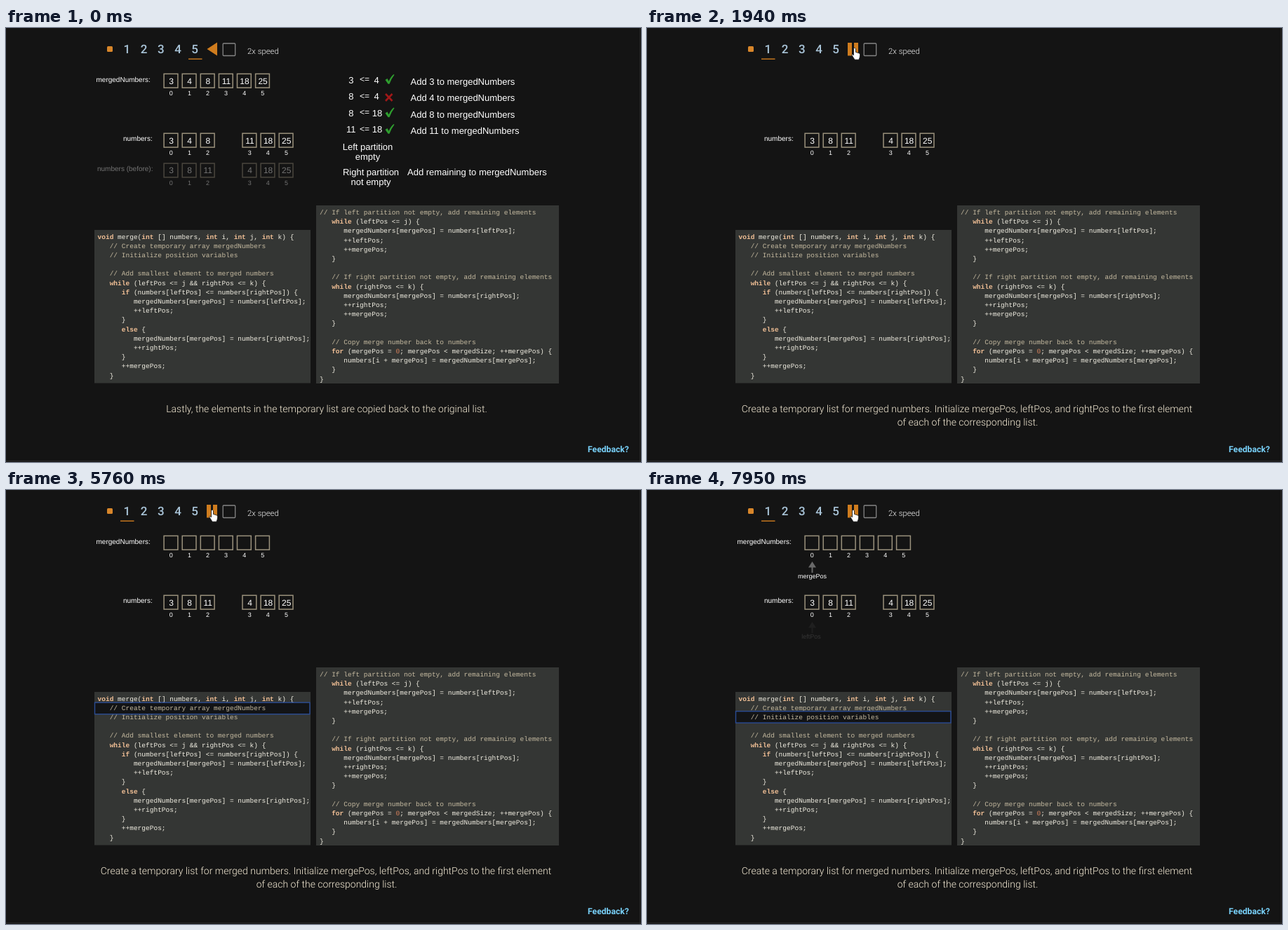
An HTML page for the animation above (8 s loop, 905x619 px).

```html
<!DOCTYPE html>
<html lang="en">
<head>
<meta charset="utf-8">
<title>Merging two partitions</title>
<style>
  html, body { margin: 0; width: 100%; height: 100%; overflow: hidden; background: #141414; }
  svg { display: block; width: 905px; height: 619px; }
  text { font-family: "Liberation Sans", Arial, sans-serif; font-size: 10px; fill: #fff;
         white-space: pre; text-rendering: geometricPrecision; }
  .mid { text-anchor: middle; }
  .ui { font-family: Roboto, sans-serif; }
  .step { font-size: 17px; font-weight: 500; fill: #a9c4d8; }
  .speed { font-size: 11.4px; font-weight: 300; fill: #f3f3f3; }
  .feedback { font-size: 12.2px; font-weight: 700; fill: #78d0f8; }
  .caption { font-size: 14px; font-weight: 300; fill: #f6ecd6; }
  .num { font-size: 12px; }
  .idx, .pos { font-size: 9px; }
  .note { font-size: 13px; }
  .cell { fill: none; stroke: #9a917c; stroke-width: 1.5; }
  .code { font-family: "Liberation Mono", "Courier New", monospace; font-size: 9.52px; fill: #f1eee2; }
  .comment { fill: #c5baa0; }
  .key { fill: #f2c096; font-weight: bold; }
  .lit { fill: #d9825c; }
</style>
</head>
<body>
<svg id="stage" viewBox="0 0 905 619"></svg>
<script>
const LOOP = 8000, PITCH = 26.1, LINE = 13.2;

const leftCode = `void merge(int [] numbers, int i, int j, int k) {
   // Create temporary array mergedNumbers
   // Initialize position variables

   // Add smallest element to merged numbers
   while (leftPos <= j && rightPos <= k) {
      if (numbers[leftPos] <= numbers[rightPos]) {
         mergedNumbers[mergePos] = numbers[leftPos];
         ++leftPos;
      }
      else {
         mergedNumbers[mergePos] = numbers[rightPos];
         ++rightPos;
      }
      ++mergePos;
   }`.split("\n");

const rightCode = `// If left partition not empty, add remaining elements
   while (leftPos <= j) {
      mergedNumbers[mergePos] = numbers[leftPos];
      ++leftPos;
      ++mergePos;
   }

   // If right partition not empty, add remaining elements
   while (rightPos <= k) {
      mergedNumbers[mergePos] = numbers[rightPos];
      ++rightPos;
      ++mergePos;
   }

   // Copy merge number back to numbers
   for (mergePos = 0; mergePos < mergedSize; ++mergePos) {
      numbers[i + mergePos] = mergedNumbers[mergePos];
   }
}`.split("\n");

// Markup helpers
const esc = s => String(s).replace(/&/g, "&amp;").replace(/</g, "&lt;");
const text = (x, y, cls, s) => `<text x="${x}" y="${y}" class="${cls}">${esc(s)}</text>`;
const rect = (x, y, w, h, attrs) => `<rect x="${x}" y="${y}" width="${w}" height="${h}" ${attrs}/>`;
const group = (id, ...parts) => `<g id="${id}">${parts.join("")}</g>`;

function codeLine(x, y, line) {
  const body = /^\s*\/\//.test(line)
    ? `<tspan class="comment">${line}</tspan>`
    : esc(line)
        .replace(/\b(void|int|while|if|else|for)\b/g, "<tspan class='key'>$1</tspan>")
        .replace(/= 0;/, "= <tspan class='lit'>0</tspan>;");
  return `<text x="${x}" y="${y}" class="code">${body}</text>`;
}
const codeBlock = (x, y, lines) => lines.map((s, i) => codeLine(x, y + i * LINE, s)).join("");

// Cell centres: one run of six, or two runs of three
const joined = i => 235 + i * PITCH;
const split = i => joined(i) + (i > 2 ? 33.6 : 0);
const six = fn => [0, 1, 2, 3, 4, 5].map(fn).join("");
const cells = (at, y) => six(i =>
  rect(at(i) - 9.9, y - 9.9, 19.8, 19.8, 'class="cell"') + text(at(i) + .3, y + 20.5, "idx mid", i));
const values = (at, y, list) => six(i => text(at(i) + .6, y + 4.4, "num mid", list[i]));

const pointer = (id, x, y, label) => group(id,
  `<path d="M235.5 ${y}l5.5 8.5h-4.5v7.5h-2v-7.5h-4.5z" fill="#696969"/>`,
  text(x, y + 24, "pos mid", label));

const tick = y => `<path d="M540.5 ${y + 1}l3-2 2 4q3-7 7-10l1 .8q-4 5-7 13h-2z" fill="#2f9e2f"/>`;
const cross = y => `<path d="M541 ${y - 5}l9.5 10m0-10l-9.5 10" stroke="#a01818" stroke-width="2.6"/>`;

const compare = (y, a, b, mark) =>
  text(491.8, y, "note mid", a) + text(504, y - 1.5, "num", "<=") +
  text(b > 9 ? 529 : 528, y, "note mid", b) + mark;

const sorted = [3, 4, 8, 11, 18, 25], before = [3, 8, 11, 4, 18, 25];

document.getElementById("stage").innerHTML = [
  rect(0, 0, 905, 619, 'fill="#141414"'),
  rect(903, 0, 1, 619, 'fill="#252525"') + rect(0, 617, 905, 1, 'fill="#2a2a2a"'),

  // Toolbar
  rect(144, 26, 8, 8, 'rx="1.5" fill="#d8862a"'),
  [1, 2, 3, 4, 5].map(n => text(148.2 + 24.2 * n, 36, "ui step mid", n)).join(""),
  rect(163, 43.5, 19.5, 1.4, 'id="underline" fill="#cf7c1e"'),
  '<path id="play" d="M286.5 30l14.5-9.5v19z" fill="#cf7c1e"/>',
  '<path id="pause" d="M286 21h6v18.5h-6zm9 0h6v18.5h-6z" fill="#cf7c1e"/>',
  rect(309.2, 22, 17.5, 17.5, 'rx="1" fill="none" stroke="#858585" stroke-width="1.3"'),
  text(344, 37, "ui speed", "2x speed"),

  // Arrays
  group("mergedLabel", text(128.5, 77, "", "mergedNumbers:")),
  group("mergedCells", cells(joined, 75.3)),
  text(167, 160.7, "", "numbers:"),
  cells(split, 160.2),
  group("newValues", values(split, 160.2, before)),
  group("finished",
    values(joined, 75.3, sorted),
    values(split, 160.2, sorted),
    `<g opacity=".4">${text(130, 203.7, "", "numbers (before):")}${cells(split, 203)}${values(split, 203, before)}</g>`,
    compare(78.5, 3, 4, tick(73)),
    compare(102.2, 8, 4, cross(99)),
    compare(125.8, 8, 18, tick(120.5)),
    compare(149, 11, 18, tick(144)),
    [3, 4, 8, 11].map((n, i) => text(576.5, 81 + 23.4 * i, "note", `Add ${n} to mergedNumbers`)).join(""),
    text(515.5, 174, "note mid", "Left partition"),
    text(515.5, 188, "note mid", "empty"),
    text(520, 210, "note mid", "Right partition"),
    text(520, 224, "note mid", "not empty"),
    text(572, 210, "note", "Add remaining to mergedNumbers")),
  pointer("mergePos", 235.5, 102, "mergePos"),
  pointer("leftPos", 234, 188, "leftPos"),

  // Code
  rect(126, 288, 308, 218.5, 'fill="#343634"'),
  rect(442, 253, 346, 254, 'fill="#343634"'),
  codeBlock(130.5, 300.5, leftCode),
  codeBlock(447, 266, rightCode),
  group("highlight",
    rect(126.5, 303, 306.5, 16.5, 'id="bar" fill="#131416" stroke="#2b4c94" stroke-width="1.4"'),
    group("line1", codeLine(130.5, 300.5 + LINE, leftCode[1])),
    group("line2", codeLine(130.5, 300.5 + 2 * LINE, leftCode[2]))),

  // Captions
  group("oldCaption", text(457, 547.5, "ui caption mid",
    "Lastly, the elements in the temporary list are copied back to the original list.")),
  group("newCaption",
    text(456, 547.5, "ui caption mid",
      "Create a temporary list for merged numbers. Initialize mergePos, leftPos, and rightPos to the first element"),
    text(457, 566.7, "ui caption mid", "of each of the corresponding list.")),
  text(829, 604.8, "ui feedback", "Feedback?"),

  // Mouse
  `<g id="mouse" fill="#fff" stroke="#111" stroke-width=".8">
    <path id="arrow" d="M0 0v14l3.2-3 2.2 5 2.4-1-2.2-5h4.6z"/>
    <path id="hand" d="M-1.5 1.5q1.5-2.5 3 0v5l4.5 1.3q1.8.6 1.7 2.4-.2 4-1.7 7h-6l-4-6.5q-.6-2.5 2.5 0z"/>
  </g>`
].join("");

const el = id => document.getElementById(id);
const fade = (id, v) => el(id).setAttribute("opacity", v);
const ramp = (t, a, b) => Math.min(1, Math.max(0, (t - a) / (b - a)));
const swing = (t, a, b) => .5 - Math.cos(Math.PI * ramp(t, a, b)) / 2;

function moveMouse(t) {
  let x = 296, y = 28;
  if (t < 1180) {
    const e = 1 - (1 - ramp(t, 260, 1100)) ** 2;
    x = 757 - 456 * e;
    y = 11 + 17 * e + 16 * Math.sin(Math.PI * e);
  } else if (t >= 3360) x = t < 3440 ? 295 : 294;
  el("mouse").setAttribute("transform", `translate(${x} ${y})`);
  fade("mouse", +(t >= 300));
  fade("hand", +(x < 302));
  fade("arrow", +(x >= 302));
}

function draw(t) {
  const playing = t >= 1180;
  const gone = 1 - ramp(t, 1170, 1480);
  el("underline").setAttribute("x", playing ? 163 : 260);
  fade("play", +!playing);
  fade("pause", +playing);
  fade("finished", gone);
  fade("newValues", 1 - gone);
  fade("mergedLabel", Math.max(gone, swing(t, 3710, 4710)));
  fade("mergedCells", Math.max(gone, swing(t, 4710, 5710)));
  fade("mergePos", swing(t, 6710, 7710));
  fade("leftPos", swing(t, 7710, 8710));
  fade("oldCaption", 1 - ramp(t, 1530, 1720));
  fade("newCaption", ramp(t, 1720, 1940));

  const slide = swing(t, 5700, 6600);
  fade("highlight", t < 5760 ? .9 * swing(t, 2710, 3300) : 1);
  el("bar").setAttribute("y", 303 + 12.6 * slide);
  fade("line1", +(slide < .5));
  fade("line2", +(slide >= .5));
  moveMouse(t);
}

function run() {
  draw(performance.now() % LOOP);
  requestAnimationFrame(run);
}
run();
</script>
</body>
</html>
```
